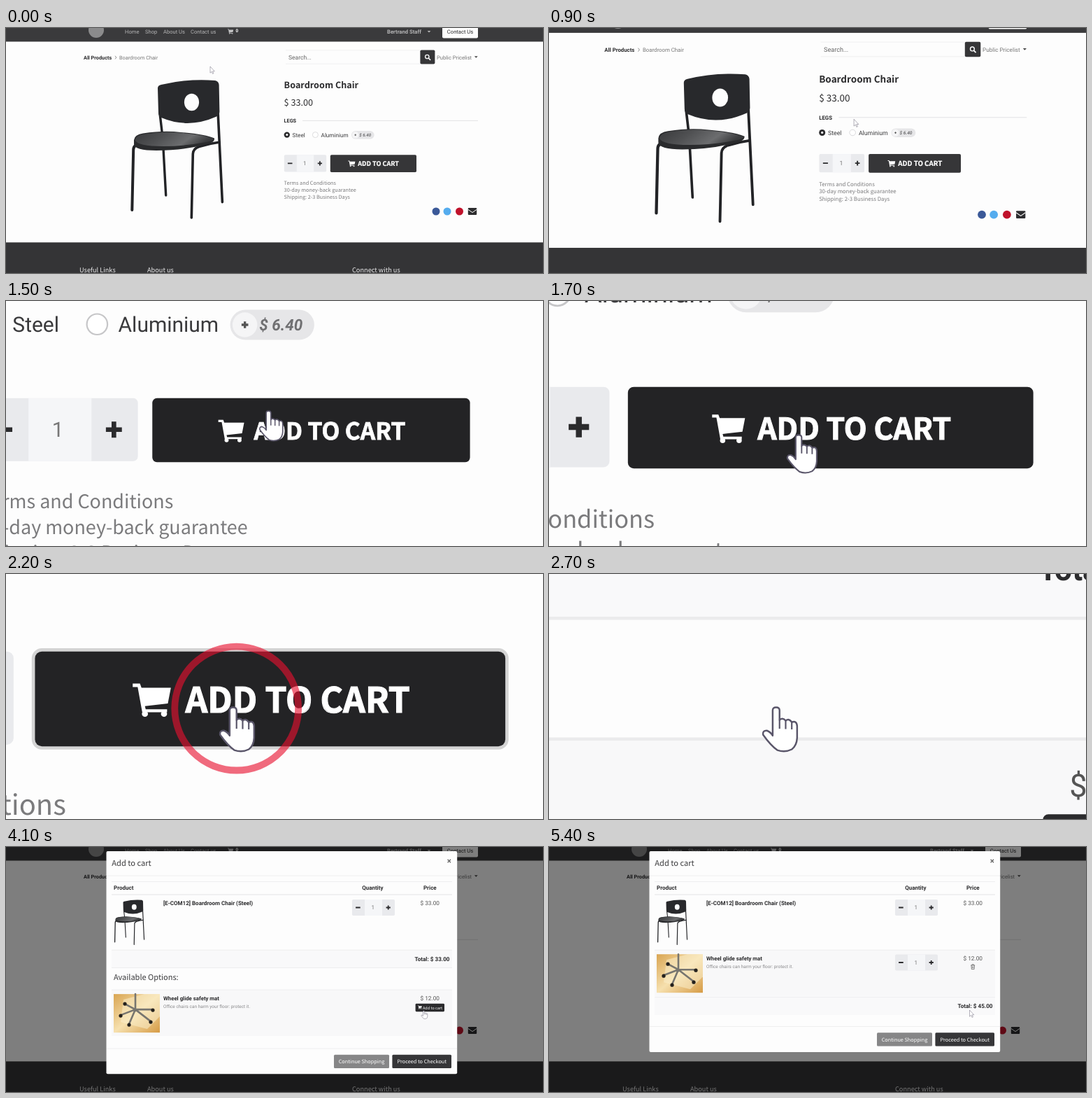
These frames come from a looping animation (768 by 350 pixels, 5.8 s). An HTML page:

```html
<!DOCTYPE html>
<html lang="en">
<head>
<meta charset="utf-8">
<title>Add to cart</title>
<style>
  html, body { margin: 0; width: 100%; height: 100%; overflow: hidden; background: #fdfdfd; }
  svg { display: block; width: 768px; height: 350px; }
  text { font-family: Roboto, Arial, sans-serif; text-rendering: geometricPrecision; white-space: pre; }
  .s { font-family: 'Noto Sans CJK SC', 'Noto Sans CJK JP', 'Noto Sans CJK KR', 'Noto Sans CJK', 'Open Sans', sans-serif; }
  .b { font-weight: 700; }
  .m { font-weight: 500; }
  .i { font-style: italic; }
  .c { text-anchor: middle; }
  .e { text-anchor: end; }
  .heavy { stroke: #fff; stroke-width: .22px; }
</style>
</head>
<body>
<svg id="stage" viewBox="0 0 768 350">
  <defs>
    <linearGradient id="seat" x1="0" y1="0" x2="1" y2=".25">
      <stop offset="0" stop-color="#38393b"/><stop offset=".4" stop-color="#505153"/>
      <stop offset=".75" stop-color="#6c6d6f"/><stop offset="1" stop-color="#3a3b3d"/>
    </linearGradient>
    <linearGradient id="wood" x1="0" y1="0" x2="1" y2="1">
      <stop offset="0" stop-color="#d9a552"/><stop offset=".5" stop-color="#f6e0ae"/><stop offset="1" stop-color="#d69b45"/>
    </linearGradient>
  </defs>
  <g id="cam"></g>
</svg>
<script>
const LOOP = 5800, STEP = 100;
const DARK = '#363638', INK = '#2b2b2d', GREY = '#777';
const PRODUCT = 'Boardroom Chair', EXTRA = 'Wheel glide safety mat';
const $ = id => document.getElementById(id);

// Markup helpers
const text = (x, y, str, size, fill = INK, cls = '') =>
  `<text x="${x}" y="${y}" font-size="${size}" fill="${fill}" class="${cls}">${str}</text>`;
const rect = (x, y, w, h, fill, r = 0, extra = '') =>
  `<rect x="${x}" y="${y}" width="${w}" height="${h}" rx="${r}" fill="${fill}" ${extra}/>`;
const circle = (x, y, r, fill, extra = '') =>
  `<circle cx="${x}" cy="${y}" r="${r}" fill="${fill}" ${extra}/>`;
const path = (d, fill, extra = '') => `<path d="${d}" fill="${fill}" ${extra}/>`;
const line = (d, stroke, w = 1, extra = '') =>
  path(d, 'none', `stroke="${stroke}" stroke-width="${w}" ${extra}`);
const hline = (x1, x2, y, stroke = '#ebebec') => line(`M${x1} ${y}H${x2}`, stroke, .8);
const group = (body, x = 0, y = 0, k = 1) =>
  `<g transform="translate(${x} ${y}) scale(${k})">${body}</g>`;
const caret = (x, y, fill) => path(`M${x - 2.4} ${y}h4.8l-2.4 2.5z`, fill);

const cart = (x, y, k, fill = '#fff') => group(
  path('M0 0h1.9l.4 1.1h7.7l-.8 4.1-6 .7.2.8h5.6v.8H2.5L1.3.9H0z', fill) +
  circle(3.2, 7.9, .8, fill) + circle(8.2, 7.9, .8, fill), x, y, k);

const qty = (x, y, w, h) => {
  const cy = y + h / 2, lx = x + 8.4, rx = x + w - 9.3;
  return rect(x, y, w, h, '#e9eaed', 1.8) +
    rect(x + 18, y, w - 36, h, '#f5f6f8') +
    line(`M${lx - 3.3} ${cy}h6.6M${rx - 3.1} ${cy}h6.2M${rx} ${cy - 3.1}v6.2`, INK, 1.8) +
    text(x + w / 2 - .8, cy + 2.9, '1', 8.1, GREY, 'c');
};

const chair = (() => {
  const leg = (d, w = 4) => line(d, '#222326', w, 'stroke-linecap="round" stroke-linejoin="round"');
  return leg('M220 122L223.5 152M225 172L228.7 239', 3.4) +
    leg('M303 118L309.4 248.6', 3.6) +
    leg('M304.5 163.2Q290 165 276 169.5Q267.5 172.5 267.3 180L265.3 271', 3.6) +
    leg('M192 166Q182.5 166 182.2 174L180.3 260') +
    path('M217 86Q217 82 222 81Q260 72 299 75Q304 76 304.6 81L305.4 119.5Q305.4 124 301 126.5Q261 144.5 222 128Q218 126 218 121Z', '#28292c') +
    '<ellipse cx="265.5" cy="106" rx="10.6" ry="12.2" fill="#fdfdfd"/>' +
    path('M183 160Q184 152 196 150.5Q226 146 250 149Q285 152 298 157.5Q299 163 288 165.5Q255 175 215 175Q184 175 183 166Z', '#2a2b2d') +
    path('M184.5 160Q186 153 198 151.5Q226 147 250 149.8Q283 152.5 297 158Q296 161 286 163Q255 169 225 169Q188 169 184.5 160Z', 'url(#seat)');
})();

const floorPhoto = (x, y) => group(
  rect(0, 0, 66, 55, 'url(#wood)') +
  path('M14 8L44 0H66V32L48 50L10 40Z', '#fbeecb', 'opacity=".55"') +
  line('M31 0V24M31 22L10 30M31 22L22 43M31 22L53 39M31 22L55 22M31 22L16 14', '#77756f', 2.6, 'stroke-linecap="round"') +
  [[10, 31], [22, 44], [53, 40], [56, 23], [16, 14]].map(p => circle(...p, 2.6, '#25211d')).join(''), x, y);

const envelope = rect(660.8, 257, 12.4, 10, '#2d2d2f', 1) +
  line('M660.8 259.3l6.2 4.3 6.2-4.3', '#fdfdfd', 1);

const page = () =>
  rect(0, 0, 768, 350, '#fdfdfd') +
  rect(0, -10, 768, 29.5, '#3a3a3c') +
  circle(129, 3, 11, '#8b8b8c') +
  [[170, 'Home'], [199, 'Shop'], [225, 'About Us'], [264, 'Contact us']]
    .map(([x, s]) => text(x, 8.4, s, 7.6, '#b4b4b5')).join('') +
  cart(317, 1.6, .82, '#c4c4c5') + text(328.5, 5.6, '0', 6.4, '#fff', 'b') +
  text(545, 8.4, 'Bertrand Staff', 7.7, '#b4b4b5', 'b') + caret(605, 4, '#b4b4b5') +
  rect(624, -8, 51, 22.5, '#fdfdfd', 2) + text(649.5, 8.4, 'Contact Us', 7.6, INK, 'c') +

  text(111, 44.8, 'All Products', 7.3, INK, 'b') +
  line('M156 39.8l1.8 2.3-1.8 2.3', GREY, .8) +
  text(162, 44.8, PRODUCT, 7.3, GREY) +
  line('M400 51.2H593M400 31.8H593', '#e6e6e8', .6) +
  text(404, 44.8, 'Search...', 8.5, '#666') +
  rect(592.4, 31.5, 21, 20, DARK, 1.8) +
  line('M604.5 43.3l2.6 2.6', '#fff', 1.6) + circle(602.3, 41, 2.7, 'none', 'stroke="#fff" stroke-width="1.3"') +
  text(616, 44.5, 'Public Pricelist', 7.6, GREY) + caret(672.3, 40.2, '#444') +

  chair +
  text(397.6, 85.5, PRODUCT, 12.6, INK, 's b') +
  text(397.6, 111.2, '$ 33.00', 12.65, INK, 's') +
  text(397.6, 135, 'LEGS', 7.3, INK, 'b') + hline(424, 675, 132.4, '#dedee0') +
  circle(401.8, 152.6, 4.2, INK) + circle(401.8, 152.6, 1.5, '#fff') +
  text(409.6, 155.6, 'Steel', 8.14, '#3a3a3c') +
  circle(442.4, 152.6, 4, '#fff', 'stroke="#c6c6c8" stroke-width=".6"') +
  text(450.6, 155.6, 'Aluminium', 8.14, '#3a3a3c') +
  rect(494, 147, 32.6, 11.6, '#e6e6e8', 5.8) + circle(499.7, 152.8, 4.8, '#f5f5f6') +
  line('M498.4 152.8h2.6M499.7 151.5v2.6', '#555', .9) +
  text(505.3, 154.9, '$ 6.40', 6.1, '#707072', 'b i') +

  qty(397.8, 181.2, 60.4, 24.4) +
  rect(463.8, 181.2, 123.2, 24.8, 'none', 1.8, 'id="focus" stroke="#000" stroke-opacity=".16" stroke-width="1.7"') +
  rect(463.8, 181.2, 123.2, 24.8, DARK, 1.8, 'id="buy"') +
  cart(489.4, 189.6, 1) + text(503.2, 197.2, 'ADD TO CART', 9.1, '#fff', 's b heavy') +
  ['Terms and Conditions', '30-day money-back guarantee', 'Shipping: 2-3 Business Days']
    .map((s, i) => text(397.6, 223.9 + i * 9.85, s, 7.3, '#7b7b7d', 's')).join('') +
  circle(615, 262, 5.5, '#3b5998') + circle(631, 262, 5.5, '#55acee') + circle(648.5, 262, 5.5, '#c0122b') + envelope +

  rect(0, 306.3, 768, 44, '#343436') +
  [[105, 'Useful Links'], [202, 'About us'], [495, 'Connect with us']]
    .map(([x, s]) => text(x, 349, s, 9.2, '#ededee', 's m')).join('');

const price = (y, amount) => text(592.5, y, `$ ${amount}.00`, 8.25, '#555');

const extraRow = y =>
  rect(151, y, 487, 66, '#f8f8f9') + floorPhoto(154, y + 6) +
  text(225, y + 15, EXTRA, 7.8, INK, 'b') +
  text(225, y + 25.5, 'Office chairs can harm your floor: protect it.', 6.47, '#8a8a8c') +
  price(y + 15, 12);

const total = (y, sum) =>
  rect(151, y, 487, 25.4, '#f9f9fa') + hline(151, 638, y) +
  text(634.5, y + 15.3, `Total: $ ${sum}.00`, 8.14, INK, 'b e');

const footer = y =>
  hline(144, 645, y) +
  rect(469, y + 8.8, 79, 19.2, '#868687', 1.5) + text(508.5, y + 21.2, 'Continue Shopping', 7.3, '#fff', 's m c') +
  rect(552.4, y + 8.8, 84.6, 19.2, DARK, 1.5) + text(594.7, y + 21.2, 'Proceed to Checkout', 7.3, '#fff', 's m c');

const trash = line('M603.2 169h6M605 169v-1.2h2.4V169M604 169l.3 5.6h3.8l.3-5.6M605.4 170.6v2.6M607 170.6v2.6', '#555', .7);

const modal = added =>
  rect(143.5, 6, 501.7, added ? 287 : 318.3, '#fdfdfd', 2) +
  text(151.3, 27.2, 'Add to cart', 11.1, '#3a3a3c', 's') +
  line('M631.6 17.8l4.4 4.4m0-4.4l-4.4 4.4', '#666', 1.3) +
  hline(144, 645, 41) + hline(151, 638, 49.5) + hline(151, 638, 68, '#dededf') +
  text(154, 61.2, 'Product', 8, INK, 'b') +
  text(524.3, 61.2, 'Quantity', 8, INK, 'b c') +
  text(606.3, 61.2, 'Price', 8, INK, 'b c') +
  group(chair, 97, 51.3, .325) +
  text(225, 83.3, `[E-COM12] ${PRODUCT} (Steel)`, 8, INK, 'b') +
  qty(495, 75, 61, 23) + price(83.3, 33) +
  (added
    ? extraRow(147.2) + hline(151, 638, 147.2) + qty(495, 153.5, 61, 23) + trash + total(214.4, 45) + footer(256.5)
    : total(147.2, 33) + hline(151, 638, 172.5) +
      text(154, 190, 'Available Options:', 11, '#3a3a3c', 's') +
      extraRow(204.1) + hline(151, 638, 204.1) +
      rect(585.6, 223.8, 41.4, 11.4, INK, 1.4) + cart(589, 226.6, .58) +
      text(596, 231.6, 'Add to cart', 5.5, '#fff', 's m') + footer(288));

const pen = 'stroke="#5a566a" stroke-width=".45" stroke-linejoin="round"';
const arrow = path('M0 0V9.2L2.1 7.3L3.5 10.4L4.9 9.8L3.5 6.8H6.3Z', '#fff', pen);
const hand = path('M-.9 .8Q-.9 0 0 0Q.9 0 .9 .8V3.3Q1.7 2.6 2.5 3.5Q3.4 2.8 4.1 3.9Q5.4 3.4 5.5 4.9V8Q5.4 10 4.1 11Q2.3 11.9 .3 11.2Q-1.4 10 -3.4 7.2Q-3.6 6 -2.4 6.1Q-1.5 6.4 -.9 7.4Z', '#fff', pen) +
  line('M.9 3.3V5.6M2.5 3.6V5.7M4.1 4V5.8', '#5a566a', .4);

$('cam').innerHTML = page() +
  `<g id="dialog">${rect(0, -10, 768, 370, '#000', 0, 'opacity=".5"')}
     <g id="offer">${modal(false)}</g><g id="added">${modal(true)}</g></g>
   <circle id="ring" fill="none" stroke="#e8112f" stroke-width="1.8"/>
   <g id="cursor"><g id="arrow">${arrow}</g><g id="hand">${hand}</g></g>`;

// Motion: [time, x, y] points of the pointer tip
const POINTER = [
  [0, 292, 55], [600, 400, 112], [1200, 488.4, 157.4], [1600, 515.7, 195.8],
  [3100, 515.7, 195.8], [3300, 528, 203], [3400, 528, 203], [4000, 585, 229],
  [4100, 597.3, 234], [4300, 600, 233.5], [5100, 600, 233.5], [5400, 601.5, 233]
];
const CLICKS = [[2000, 516.6, 196.1], [4150, 600.7, 234]];
const PIVOT = [558.5, 197], ZOOM = 5.46;

const ramp = (t, a, b) => Math.min(1, Math.max(0, (t - a) / (b - a)));
const ease = u => u < .5 ? 2 * u * u : 1 - 2 * (1 - u) ** 2;
const show = (id, on) => $(id).setAttribute('visibility', on ? 'inherit' : 'hidden');

function pointerAt(t) {
  const i = POINTER.findIndex(p => p[0] > t);
  if (i < 0) return POINTER[POINTER.length - 1].slice(1);
  const [a, b] = [POINTER[i - 1], POINTER[i]], u = ramp(t, a[0], b[0]);
  return [a[1] + (b[1] - a[1]) * u, a[2] + (b[2] - a[2]) * u];
}

function draw(t) {
  const zoom = 1 + (ZOOM - 1) * (ease(ramp(t, 785, 2075)) - ease(ramp(t, 2700, 2900)));
  const [px, py] = PIVOT;
  $('cam').setAttribute('transform', `translate(${px} ${py}) scale(${zoom}) translate(${-px} ${-py})`);

  $('buy').setAttribute('fill', t >= 1500 && t < 2500 ? '#232325' : DARK);
  show('focus', t >= 2000 && t < 2700);

  $('dialog').setAttribute('opacity', ramp(t, 2450, 2650));
  show('dialog', t >= 2500);
  show('offer', t < 4800);
  show('added', t >= 4800);

  const click = CLICKS.find(c => t > c[0] && t < c[0] + 350);
  show('ring', !!click);
  if (click) {
    const [t0, x, y] = click, ring = $('ring');
    ring.setAttribute('cx', x);
    ring.setAttribute('cy', y);
    ring.setAttribute('r', 16.2 * ramp(t, t0, t0 + 200));
    ring.setAttribute('opacity', .62 * (1 - ramp(t, t0 + 200, t0 + 350)));
  }

  $('cursor').setAttribute('transform', `translate(${pointerAt(t)})`);
  const pointing = (t >= 1500 && t < 2800) || (t >= 4100 && t < 4800);
  show('hand', pointing);
  show('arrow', !pointing);
}

const start = performance.now();
let last = -1;
function tick() {
  const t = Math.floor((performance.now() - start) % LOOP / STEP) * STEP;
  if (t !== last) draw(last = t);
  requestAnimationFrame(tick);
}
tick();
</script>
</body>
</html>
```
